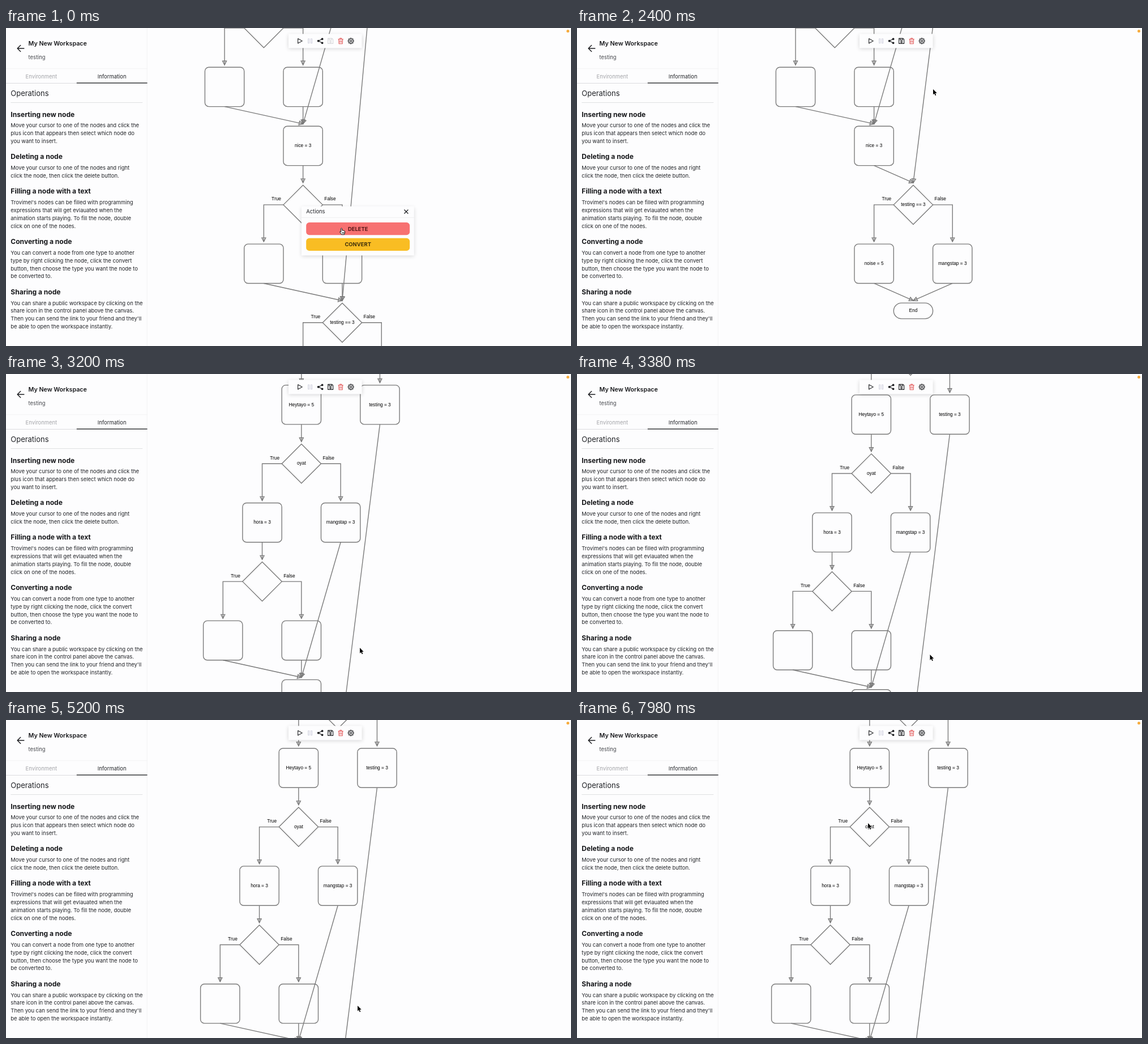
An HTML page with a canvas for the animation above (8000 ms loop, 998 by 561 pixels).

```html
<!DOCTYPE html>
<html lang="en">
<head>
<meta charset="utf-8">
<title>Flowchart workspace</title>
<style>
html, body { margin: 0; width: 100%; height: 100%; overflow: hidden; background: #fdfdfe; }
canvas { position: absolute; left: 0; top: 0; width: 998px; height: 561px; }
#side {
  position: absolute; left: 0; top: 0; width: 360px; height: 810px;
  transform: scale(.69306); transform-origin: 0 0;
  font: 13.58px/20px Inter, sans-serif; color: #212327; white-space: pre;
  box-sizing: border-box; border-right: 1px solid #eeeef0; background: #fdfdfe;
}
#side > * { position: absolute; margin: 0; }
#side h1 { left: 57px; top: 30px; font-size: 15.4px; font-weight: 600; line-height: 20px; color: #17181b; }
.sub { left: 57px; top: 64px; color: #46484d; }
.rule { left: 0; top: 103px; width: 360px; height: 1px; background: #f1f1f3; }
.tab { top: 104px; width: 180px; height: 37px; line-height: 40px; text-align: center; box-sizing: border-box; }
.off { left: 0; color: #a3a4a8; border-bottom: 1px solid #cfcfd3; }
.on { left: 180px; border-bottom: 2px solid #26272a; }
#side h2 { left: 12px; top: 153px; width: 336px; height: 36px; font-size: 18.7px; font-weight: 400; line-height: 28px; border-bottom: 1px solid #d2d3d6; }
.ops { left: 12px; top: 206px; }
.ops h3 { margin: 0 0 4px; font-size: 17.4px; font-weight: 700; line-height: 28px; color: #17181b; }
.ops p { margin: 0 0 16px; }
</style>
</head>
<body>
<canvas id="stage"></canvas>
<div id="side">
<h1>My New Workspace</h1>
<div class="sub">testing</div>
<div class="rule"></div>
<div class="tab off">Environment</div>
<div class="tab on">Information</div>
<h2>Operations</h2>
<div class="ops"><h3>Inserting new node</h3><p>Move your cursor to one of the nodes and click the
plus icon that appears then select which node do
you want to insert.</p><h3>Deleting a node</h3><p>Move your cursor to one of the nodes and right
click the node, then click the delete button.</p><h3>Filling a node with a text</h3><p>Trovimel's nodes can be filled with programming
expressions that will get evlauated when the
animation starts playing. To fill the node, double
click on one of the nodes.</p><h3>Converting a node</h3><p>You can convert a node from one type to another
type by right clicking the node, click the convert
button, then choose the type you want the node to
be converted to.</p><h3>Sharing a node</h3><p>You can share a public workspace by clicking on the
share icon in the control panel above the canvas.
Then you can send the link to your friend and they'll
be able to open the workspace instantly.</p></div>
<svg style="left:26px;top:40px" width="24" height="24" fill="none" stroke="#1b1c1f" stroke-width="2" stroke-linecap="round" stroke-linejoin="round"><path d="M20 12H3M11 4L3 12L11 20"/></svg>
</div>
<script>
const LOOP = 8000, DELETE_AT = 420, W = 998, H = 561, S = W / 1440;
const BG = '#fdfdfe', GREY = '#7a7a7a';
const cv = document.getElementById('stage'), c = cv.getContext('2d');
const dpr = window.devicePixelRatio || 1;
cv.width = W * dpr;
cv.height = H * dpr;

// Rows are [time, x, y] in stage pixels.
const PAN = [[2540, 0, 0], [2920, 1, 134.5], [3200, -2.8, 366], [3660, -7, 395], [4060, -7.8, 396.5]];
const MOUSE = [[DELETE_AT, 592.5, 353], [1100, 611, 166.5], [1540, 629, 108], [2500, 629, 108],
  [2920, 630, 301], [3200, 625, 483], [3660, 622, 503], [4060, 621, 504], [5350, 621, 504], [6750, 514, 182]];

// Monotone cubic through the keys, flat at both ends.
function track(keys, t, k) {
  const n = keys.length - 1;
  if (t <= keys[0][0]) return keys[0][k];
  if (t >= keys[n][0]) return keys[n][k];
  let i = 0;
  while (t >= keys[i + 1][0]) i++;
  const rate = j => (keys[j + 1][k] - keys[j][k]) / (keys[j + 1][0] - keys[j][0]);
  const slope = j => {
    if (j < 1 || j >= n) return 0;
    const a = rate(j - 1), b = rate(j);
    return a * b > 0 ? 2 * a * b / (a + b) : 0;
  };
  const d = keys[i + 1][0] - keys[i][0], u = (t - keys[i][0]) / d, v = 1 - u;
  return v * v * (1 + 2 * u) * keys[i][k] + u * u * (3 - 2 * u) * keys[i + 1][k]
    + d * u * v * (v * slope(i) - u * slope(i + 1));
}

function path(pts, close) {
  c.beginPath();
  for (const [x, y] of pts) c.lineTo(x, y);
  if (close) c.closePath();
}
function line(...pts) { path(pts); c.stroke(); }
function round(x, y, w, h, r) { c.beginPath(); c.roundRect(x, y, w, h, r); }
function disc(x, y, r) { c.beginPath(); c.arc(x, y, r, 0, 7); }
function label(s, x, y) { c.fillText(s, x, y); }

function box(x, y, s = '') {
  round(x - 50, y, 100, 100, 10);
  c.stroke();
  label(s, x, y + 50);
}

function arrow(...pts) {
  line(...pts);
  const [a, b] = pts.slice(-2);
  c.save();
  c.translate(...b);
  c.rotate(Math.atan2(b[1] - a[1], b[0] - a[0]));
  path([[0, 0], [-10, -5], [-10, 5]], true);
  c.stroke();
  c.restore();
}
function link(x, y, x2, y2) { arrow([x, y + 100], [x2, y2 - 6]); }

// A condition with both branches running to the row below.
function branch(x, y, s = '') {
  path([[x, y], [x + 50, y + 50], [x, y + 100], [x - 50, y + 50]], true);
  c.stroke();
  label(s, x, y + 50);
  label('True', x - 68, y + 36);
  label('False', x + 69, y + 36);
  for (const d of [-1, 1]) arrow([x + 50 * d, y + 50], [x + 100 * d, y + 50], [x + 100 * d, y + 144]);
}

function chart(extra) {
  c.strokeStyle = GREY;
  c.fillStyle = '#000';
  c.lineWidth = 2;
  c.font = '12px "Liberation Sans", Arial, sans-serif';
  c.textAlign = 'center';
  c.textBaseline = 'middle';
  branch(857, -650);
  box(757, -500, 'Heytayo = 5');
  box(957, -500, 'testing = 3');
  link(757, -500, 757, -350);
  branch(757, -350, 'oyat');
  box(657, -200, 'hora = 3');
  box(857, -200, 'mangstap = 3');
  link(657, -200, 657, -50);
  branch(657, -50);
  box(557, 100);
  box(757, 100);
  for (const [x, y] of [[557, 100], [757, 100], [857, -200]]) link(x, y, 757, 250);
  box(757, 250, 'nice = 3');
  const y = extra ? 700 : 400;
  if (extra) {
    link(757, 250, 757, 400);
    branch(757, 400);
    for (const x of [657, 857]) { box(x, 550); link(x, 550, 857, y); }
  } else {
    link(757, 250, 857, y);
  }
  link(957, -500, 857, y);
  branch(857, y, 'testing == 3');
  box(757, y + 150, 'noise = 5');
  box(957, y + 150, 'mangstap = 3');
  for (const x of [757, 957]) link(x, y + 150, 857, y + 300);
  round(807, y + 300, 100, 40, 20);
  c.stroke();
  label('End', 857, y + 320);
}

function panel(x, y, w, h) {
  c.save();
  c.shadowColor = 'rgba(0,0,0,.16)';
  c.shadowBlur = 7 * dpr;
  c.shadowOffsetY = 2 * dpr;
  c.fillStyle = BG;
  c.fillRect(x, y, w, h);
  c.restore();
}

const ICONS = [
  ['#1b1c1f', () => { path([[-5, -6], [6, 0], [-5, 6]], true); c.stroke(); }],
  ['#d5d6e2', () => { c.strokeRect(-5, -5.5, 3, 11); c.strokeRect(2, -5.5, 3, 11); }],
  ['#1b1c1f', () => {
    line([5, -5], [-5, 0], [5, 5]);
    for (const [x, y] of [[5, -5], [-5, 0], [5, 5]]) { disc(x, y, 2); c.fill(); c.stroke(); }
  }],
  ['#1b1c1f', () => {
    path([[-6.5, -6.5], [4, -6.5], [6.5, -4], [6.5, 6.5], [-6.5, 6.5]], true);
    c.stroke();
    line([-3.5, -6], [-3.5, -2.5], [3, -2.5], [3, -6]);
    disc(0, 2.3, 2);
    c.stroke();
  }],
  ['#e25555', () => {
    line([-6.5, -4.5], [6.5, -4.5]);
    line([-2, -4.5], [-2, -7], [2, -7], [2, -4.5]);
    line([-5, -4.5], [-4.3, 7], [4.3, 7], [5, -4.5]);
    for (const x of [-1.7, 1.7]) line([x, -1.5], [x, 4]);
  }],
  ['#1b1c1f', () => {
    const pts = [];
    for (let i = 0; i < 32; i++) {
      const a = (i - .5) * Math.PI / 16, r = i % 4 < 2 ? 7.2 : 5.4;
      pts.push([r * Math.cos(a), r * Math.sin(a)]);
    }
    path(pts, true);
    c.stroke();
    disc(0, 0, 2.4);
    c.stroke();
  }]
];

function toolbar(canSave) {
  panel(720, 15, 187, 36);
  c.lineWidth = 1.6;
  c.lineJoin = 'round';
  ICONS.forEach(([color, draw], i) => {
    c.save();
    c.translate(749 + 26 * i, 33);
    c.strokeStyle = c.fillStyle = i === 3 && !canSave ? '#d9d9dc' : color;
    draw();
    c.restore();
  });
  c.lineJoin = 'miter';
}

function button(y, color, ink, s) {
  c.fillStyle = color;
  round(765, y, 264, 32, 8);
  c.fill();
  c.fillStyle = ink;
  label(s, 897, y + 21);
}

function popup() {
  panel(753, 454, 287, 125);
  c.textBaseline = 'alphabetic';
  c.fillStyle = '#212327';
  c.font = '13.58px Inter, sans-serif';
  c.textAlign = 'left';
  label('Actions', 765, 472.5);
  c.textAlign = 'center';
  c.strokeStyle = '#e9e9ec';
  c.lineWidth = 1;
  line([753, 482.5], [1040, 482.5]);
  c.strokeStyle = '#1b1c1f';
  c.lineWidth = 1.7;
  line([1015, 462.5], [1025, 472.5]);
  line([1025, 462.5], [1015, 472.5]);
  c.font = '700 13.58px Inter, sans-serif';
  button(495, '#f77171', '#571818', 'DELETE');
  button(535, '#f9bd23', '#40310b', 'CONVERT');
}

function pointer(x, y, hand) {
  c.save();
  c.translate(x, y);
  c.lineJoin = 'round';
  if (hand) {
    path([[-1, .8], [0, 0], [1, .8], [1.4, 4.2], [3, 4], [4.6, 4.8], [6, 5.4], [6, 8], [5, 11.4], [.2, 11.4],
      [-1.6, 8.8], [-3, 6.6], [-2.4, 5.8], [-.6, 7]], true);
    c.fillStyle = '#fff';
    c.strokeStyle = '#111';
    c.lineWidth = 1;
    c.fill();
    c.stroke();
    for (const k of [1.4, 3, 4.5]) line([k, 7.4], [k, 9.6]);
  } else {
    path([[0, 0], [0, 9.6], [2.2, 7.6], [3.8, 11.2], [5.3, 10.5], [3.8, 7], [6.7, 6.8]], true);
    c.strokeStyle = '#fff';
    c.lineWidth = 1.4;
    c.stroke();
    c.fillStyle = '#000';
    c.fill();
  }
  c.restore();
}

function draw(t) {
  const before = t < DELETE_AT;
  c.setTransform(dpr, 0, 0, dpr, 0, 0);
  c.fillStyle = BG;
  c.fillRect(0, 0, W, H);
  c.save();
  c.translate(track(PAN, t, 1), track(PAN, t, 2));
  c.scale(S, S);
  chart(before);
  c.restore();
  c.save();
  c.scale(S, S);
  toolbar(!before);
  if (before) popup();
  c.restore();
  c.fillStyle = '#f6ab3c';
  disc(992.5, 5.5, 2.5);
  c.fill();
  pointer(track(MOUSE, t, 1), track(MOUSE, t, 2), before);
}

const start = performance.now();
function tick() {
  draw((performance.now() - start) % LOOP);
  requestAnimationFrame(tick);
}
tick();
</script>
</body>
</html>
```
